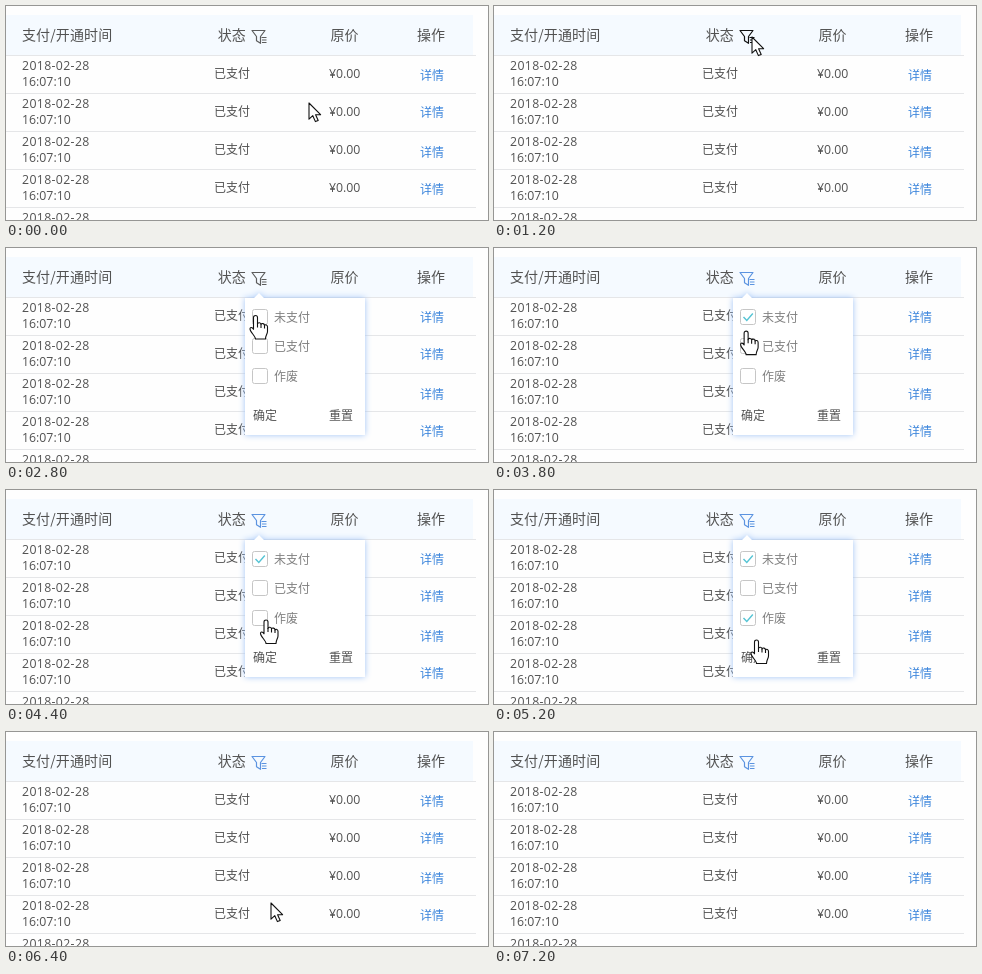
An HTML page for the animation above (8800 ms loop, 482 by 214 pixels).

```html
<!DOCTYPE html>
<html lang="zh-CN">
<head>
<meta charset="utf-8">
<style>
html, body { margin: 0; width: 100%; height: 100%; overflow: hidden; background: #fefefe; }
svg { display: block; width: 482px; height: 214px; }
text { font-family: "Noto Sans CJK SC", "Noto Sans CJK", sans-serif; font-size: 12px; fill: #525252; }
.head { font-size: 14px; letter-spacing: .12px; }
.num { font-family: "Open Sans", "Noto Sans", sans-serif; font-size: 12.3px; }
.date { letter-spacing: .35px; }
.link { fill: #3d86dc; }
.option { fill: #808080; }
.cursor { fill: #fff; stroke: #111; stroke-width: 1.1; stroke-linejoin: round; }
#popup.open .panel { filter: drop-shadow(0 0 3px #9fc3f7); }
</style>
</head>
<body>
<svg viewBox="0 0 482 214">
  <rect y="9" width="467" height="40" fill="#f5faff"/>
  <g id="table"></g>
  <g id="filter" fill="none" stroke-width="1.2" stroke-linejoin="round">
    <path d="M246 24.5H259L254.5 30.5V37.3L250.5 34.8V30.5Z"/>
    <path d="M255.5 31.5H260.5M256 34H260.5M256 36.5H260.5"/>
  </g>
  <g id="popup">
    <path class="panel" fill="#fff" d="M239 50H248L253 45L258 50H359V187H239Z"/>
    <g id="options"></g>
    <text id="confirm" x="247" y="172">确定</text>
    <text x="323" y="172">重置</text>
  </g>
  <path id="arrow" class="cursor" d="M0 0V16.2L3.8 12.7L6.4 18.6L9.2 17.4L6.6 11.7H11.6Z"/>
  <g id="hand" class="cursor">
    <path d="M-2 2C-2 -.7 2 -.7 2 2V8.5C2.4 6.7 5.5 7 5.5 9C6.2 7.4 9 7.9 9 10C10 8.7 12 9.4 12 11.3V16C12 18.5 10 20 10 23.5H0C0 20.5 -5.5 16.5 -5.5 13.5C-5.5 11.2 -3.3 11.6 -2 13.8Z"/>
    <path fill="none" d="M2 8V12M5.5 9V12.5M9 10V13"/>
  </g>
</svg>
<script>
const LOOP = 8800, STEP = 200, ROW = 38;
const $ = id => document.getElementById(id);
const label = (x, y, str, cls = '') => `<text x="${x}" y="${y}" class="${cls}">${str}</text>`;

const heads = [[16, '支付/开通时间'], [211.7, '状态'], [324.5, '原价'], [411, '操作']];
let table = heads.map(([x, str]) => label(x, 34, str, 'head')).join('');
const linkShift = [0, -1, 1, 0];
for (let i = 0; i < 5; i++) {
  const y = i * ROW;
  table += `<path d="M0 ${y + 49.5}H470" stroke="#e5e6e8"/>` + label(16, y + 64, '2018-02-28', 'num date');
  if (i === 4) break; // the last row is cut off by the stage
  table += label(16, y + 80, '16:07:10', 'num')
    + label(208, y + 72, '已支付')
    + label(323, y + 72, '¥0.00', 'num')
    + label(414, y + 74 + linkShift[i], '详情', 'link');
}
$('table').innerHTML = table;

const options = [['未支付', 61], ['已支付', 90], ['作废', 120]];
$('options').innerHTML = options.map(([str, y]) =>
  `<rect x="246.5" y="${y + .5}" width="15" height="15" rx="2" fill="#fff" stroke="#c6c6c6"/>`
  + `<path class="tick" d="M249.5 ${y + 8}l3.3 3.5l6 -7" fill="none" stroke="#55c4d4" stroke-width="1.4"/>`
  + label(268, y + 13, str, 'option')).join('');
const ticks = document.querySelectorAll('.tick');

// Pointer stops: time, x, y
const stops = [[0, 303, 97], [1200, 258, 31], [1400, 257.5, 30], [1800, 257.5, 30], [2800, 249.5, 67.5],
  [3600, 249.5, 67.5], [4400, 260, 130], [4800, 260, 130], [5600, 265, 170], [6400, 265, 171], [7200, 285, 200]];

function pointer(t) {
  const i = stops.findIndex(s => s[0] > t);
  const [t0, x0, y0] = stops[i - 1], [t1, x1, y1] = stops[i];
  const k = (t - t0) / (t1 - t0);
  return [x0 + (x1 - x0) * k, y0 + (y1 - y0) * k];
}

const show = (el, on) => { el.style.display = on ? '' : 'none'; };
const within = (t, a, b) => t >= a && t < b;

function render(ms) {
  const t = Math.floor(ms % LOOP / STEP) * STEP;
  show($('popup'), within(t, 1600, 6200));
  $('popup').classList.toggle('open', t < 6000);
  show(ticks[0], t >= 3600);
  show(ticks[1], false);
  show(ticks[2], t >= 4600);
  $('confirm').style.fill = t >= 5600 ? '#86abe2' : '';
  $('filter').setAttribute('stroke', t >= 3600 ? '#5b93e0' : within(t, 1000, 2200) ? '#111' : '#5c5c5c');

  const visible = t < 7200, hand = within(t, 1400, 6000);
  show($('hand'), visible && hand);
  show($('arrow'), visible && !hand);
  if (visible) $(hand ? 'hand' : 'arrow').setAttribute('transform', `translate(${pointer(t)})`);
}

let start;
function tick(now) {
  start ??= now;
  render(now - start);
  requestAnimationFrame(tick);
}
render(0);
requestAnimationFrame(tick);
</script>
</body>
</html>
```
